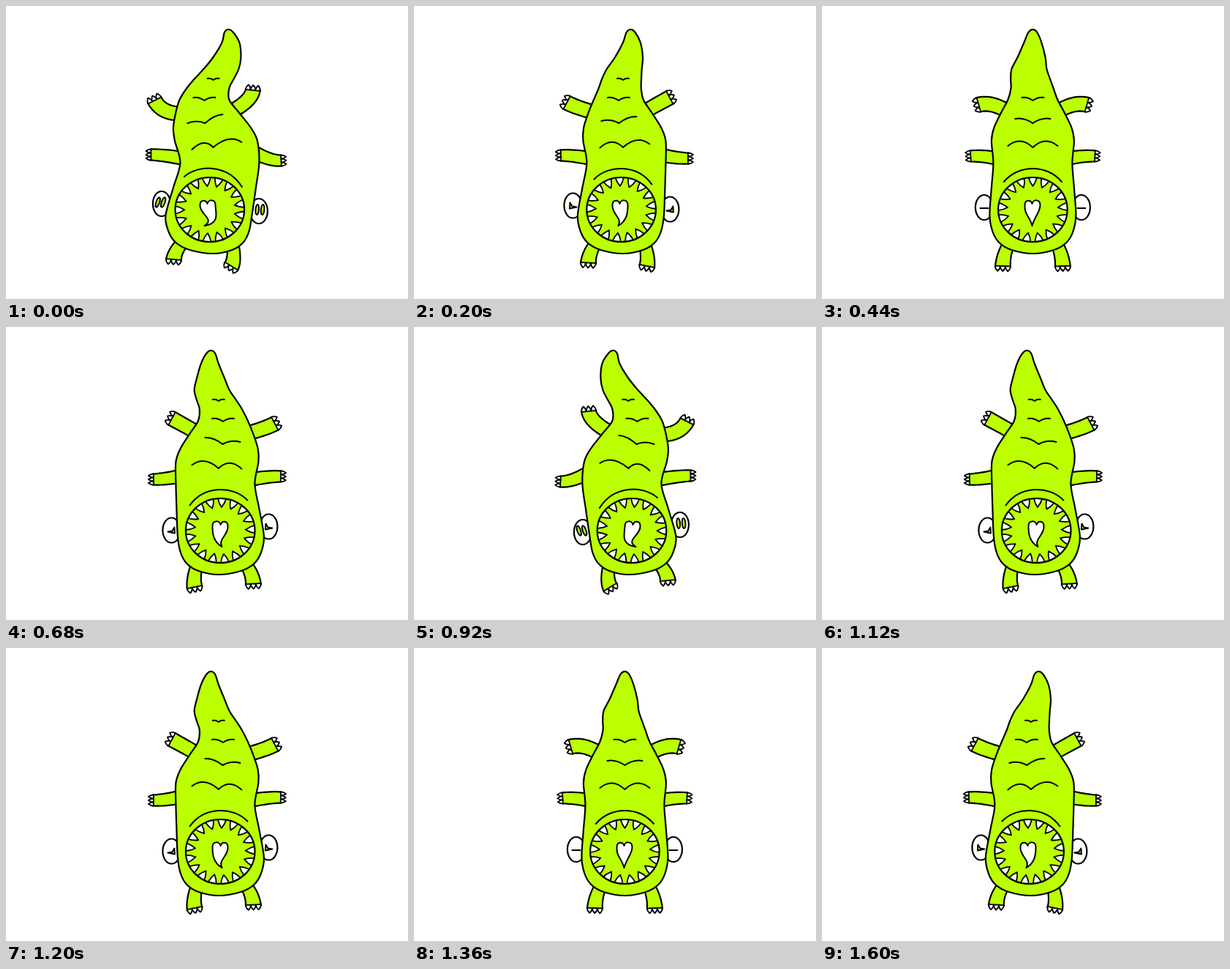
An HTML page with a canvas that plays this animation: 550x400 px, repeating every 1840 ms.

```html
<!DOCTYPE html>
<html lang="en">
<head>
<meta charset="utf-8">
<title>Wiggling creature</title>
<style>
html, body { margin: 0; width: 100%; height: 100%; overflow: hidden; background: #fff; }
canvas { display: block; }
</style>
</head>
<body>
<canvas id="stage" width="550" height="400"></canvas>
<script>
const ctx = document.getElementById('stage').getContext('2d');
const LIME = '#bbff00', INK = '#000', WHITE = '#fff';
const MID = 288.4; // vertical axis of the creature at rest
const SIDES = [-1, 1];

// Body from tail to chin: [y, half width, sideways shift at full bend]
const spine = [
  [32, 0, 16], [36, 6, 16.5], [50, 12, 19], [70, 19, 14], [86, 24, 6],
  [100, 27, -4], [112, 29, -12], [128, 34, -17], [145, 43, -13],
  [166, 53, -6.5], [184, 56.5, -1], [214, 54, 4], [248, 56.5, -3],
  [286, 59, -11], [308, 55, -11], [323, 46, -10], [333, 29, -8], [338, 0, -5]
];

// Hip, knee and wrist as x, y pairs (x outward from the axis) when the
// body bends away from the limb, rests, or bends towards it
const limbs = [
  { hip: 9.5, wrist: 10,
    away: [49, 147, 76, 147, 85.5, 128], rest: [36, 143, 58, 130, 75, 135], near: [20, 144, 48, 129, 49.5, 114] },
  { hip: 9, wrist: 7.5,
    away: [45, 208, 76, 203, 91, 203], rest: [49, 208, 69, 204, 86, 205], near: [50, 199, 73, 212, 89, 211] },
  { hip: 8, wrist: 10.5,
    away: [46, 322, 58, 335, 59, 347], rest: [33, 325, 40.5, 340, 41, 356], near: [22, 326, 25, 347, 19.5, 356] }
];

// Wrinkles on the back; drift and tilt follow the bend
const wrinkles = [
  { y: 99, half: 8, drift: 4.8, tilt: 0, arch: 1, notch: 2 },
  { y: 125, half: 15, drift: 17, tilt: 0, arch: 1, notch: 4 },
  { y: 154, half: 24, drift: 16, tilt: 6, arch: 2, notch: 6 },
  { y: 191, half: 34, drift: 0, tilt: 5, arch: 14, notch: 2 }
];

// [until ms, bend]
const beats = [[200, 1], [440, .5], [680, 0], [920, -.5], [1120, -1],
  [1160, -.5], [1200, -1], [1360, -.5], [1600, 0], [1840, .5]];
const LOOP = 1840;

function shape(fill, width, trace) {
  ctx.beginPath();
  trace();
  if (fill) {
    ctx.fillStyle = fill;
    ctx.fill();
  }
  ctx.lineWidth = width;
  ctx.stroke();
}

function oval(x, y, rx, ry, tilt = 0) {
  ctx.ellipse(x, y, rx, ry, tilt, 0, Math.PI * 2);
}

// Closed Catmull-Rom loop
function loop(pts) {
  const n = pts.length, at = i => pts[(i + n) % n];
  ctx.moveTo(...pts[0]);
  for (let i = 0; i < n; i++) {
    const [a, b, c, d] = [at(i - 1), at(i), at(i + 1), at(i + 2)];
    ctx.bezierCurveTo(b[0] + (c[0] - a[0]) / 6, b[1] + (c[1] - a[1]) / 6,
      c[0] - (d[0] - b[0]) / 6, c[1] - (d[1] - b[1]) / 6, c[0], c[1]);
  }
  ctx.closePath();
}

function drawBody(bend) {
  const edge = side => ([y, half, sway]) => {
    const slack = 5 * (1 - bend * bend) * Math.exp(-(((y - 88) / 18) ** 2));
    return [MID + sway * bend - slack + side * half, y];
  };
  const left = spine.slice(1, -1).reverse().map(edge(-1));
  shape(LIME, 2.2, () => loop([...spine.map(edge(1)), ...left]));
}

function drawLimb(limb, side, bend) {
  const pull = side * bend, key = pull > 0 ? limb.near : limb.away;
  const [x0, y0, x1, y1, x2, y2] = limb.rest.map((v, i) => v + Math.abs(pull) * (key[i] - v));
  // Point at t along the limb, moved across and forward
  const spot = (t, across, ahead = 0) => {
    const u = 1 - t;
    const dx = u * (x1 - x0) + t * (x2 - x1), dy = u * (y1 - y0) + t * (y2 - y1);
    const len = Math.hypot(dx, dy);
    const x = u * u * x0 + 2 * u * t * x1 + t * t * x2 + (dx * ahead - dy * across) / len;
    const y = u * u * y0 + 2 * u * t * y1 + t * t * y2 + (dy * ahead + dx * across) / len;
    return [MID + side * x, y];
  };
  shape(LIME, 2.2, () => {
    for (const edge of SIDES) {
      for (let i = 0; i <= 10; i++) {
        const t = edge < 0 ? i / 10 : 1 - i / 10;
        ctx.lineTo(...spot(t, edge * (limb.hip + (limb.wrist - limb.hip) * t)));
      }
    }
  });
  for (let i = -1; i <= 1; i++) {
    const w = limb.wrist / 3, c = i * w * 2;
    shape(WHITE, 1.8, () => {
      ctx.moveTo(...spot(1, c - w, -1));
      ctx.quadraticCurveTo(...spot(1, c - w, 3), ...spot(1, c, 6));
      ctx.quadraticCurveTo(...spot(1, c + w, 3), ...spot(1, c + w, -1));
      ctx.closePath();
    });
  }
}

function drawEye(side, bend) {
  const x = MID + side * 66.5 - 9 * bend, y = 275 + 5 * side * bend;
  shape(WHITE, 2.2, () => oval(x, y, 12, 17));
  if (!bend) {
    shape(null, 2, () => { ctx.moveTo(x - 5.5, y + 1); ctx.lineTo(x + 5.5, y + 1); });
  } else if (Math.abs(bend) < 1) {
    const dir = side * Math.sign(bend);
    shape(LIME, 2, () => {
      ctx.moveTo(x + dir * 4, y - 4);
      ctx.lineTo(x + dir * 4.5, y + 4);
      ctx.lineTo(x - dir * 5, y + 2);
      ctx.lineTo(x + dir, y + 1);
      ctx.closePath();
    });
  } else {
    for (const s of SIDES) {
      shape(LIME, 2, () => oval(x + side * 1.5 + s * 3.7, y - 2, 2.3, 7, bend * (.2 - .12 * side)));
    }
  }
}

function drawWrinkles(bend) {
  for (const w of bend ? wrinkles : wrinkles.slice(1)) {
    const x = MID - w.drift * bend, nx = x - (w.drift ? 0 : 5 * bend);
    const tilt = w.tilt * bend, ny = w.y + w.notch;
    shape(null, 2, () => {
      ctx.moveTo(x - w.half, w.y + tilt);
      ctx.quadraticCurveTo(x - w.half / 2, w.y - w.arch + tilt / 2, nx, ny);
      ctx.quadraticCurveTo(x + w.half / 2, w.y - w.arch - tilt / 2, x + w.half, w.y - tilt);
    });
  }
  const x = MID - 5 * bend;
  shape(null, 2, () => {
    ctx.moveTo(x - 39.5, 240 - 7 * bend);
    ctx.bezierCurveTo(x - 20, 216, x + 20, 216, x + 39.5, 240 + 7 * bend);
  });
}

function drawMouth(bend) {
  const x = MID - 9.6 * bend, y = 278, rx = 47.3, ry = 44, teeth = 17;
  for (let i = 0; i < teeth; i++) {
    const mid = (i / teeth - .25) * Math.PI * 2 - bend * .1;
    const spot = (turn, r) => [x + rx * r * Math.cos(mid + turn), y + ry * r * Math.sin(mid + turn)];
    shape(WHITE, 1.8, () => {
      ctx.moveTo(...spot(-.12, 1));
      ctx.quadraticCurveTo(...spot(-.1, .85), ...spot(0, .73));
      ctx.quadraticCurveTo(...spot(.1, .85), ...spot(.12, 1));
    });
  }
  shape(null, 2.2, () => oval(x, y, rx, ry));
}

// Heart whose tail curls as the body bends
function drawHeart(bend) {
  const curl = Math.abs(bend);
  ctx.save();
  ctx.translate(287.5 - 12 * bend, 278);
  ctx.scale(bend < 0 ? -1 : 1, 1);
  shape(WHITE, 2, () => {
    ctx.moveTo(0, -8);
    ctx.bezierCurveTo(1, -14, 11, -15, 11, -6);
    ctx.bezierCurveTo(11, 3, 3 + 15 * curl, 10 + 9 * curl, -4 * curl, 22);
    ctx.bezierCurveTo(-3 + 14 * curl, 10 + 3 * curl, -11, 6, -10, -6);
    ctx.bezierCurveTo(-10, -14, -2, -14, 0, -8);
    ctx.closePath();
  });
  ctx.restore();
}

function draw(bend) {
  ctx.fillStyle = WHITE;
  ctx.fillRect(0, 0, 550, 400);
  ctx.strokeStyle = INK;
  ctx.lineCap = ctx.lineJoin = 'round';
  for (const side of SIDES) {
    drawEye(side, bend);
    limbs.forEach(limb => drawLimb(limb, side, bend));
  }
  drawBody(bend);
  drawWrinkles(bend);
  drawMouth(bend);
  drawHeart(bend);
}

const start = performance.now();
function tick() {
  const t = (performance.now() - start) % LOOP;
  draw(beats.find(([until]) => t < until)[1]);
  requestAnimationFrame(tick);
}
tick();
</script>
</body>
</html>
```
